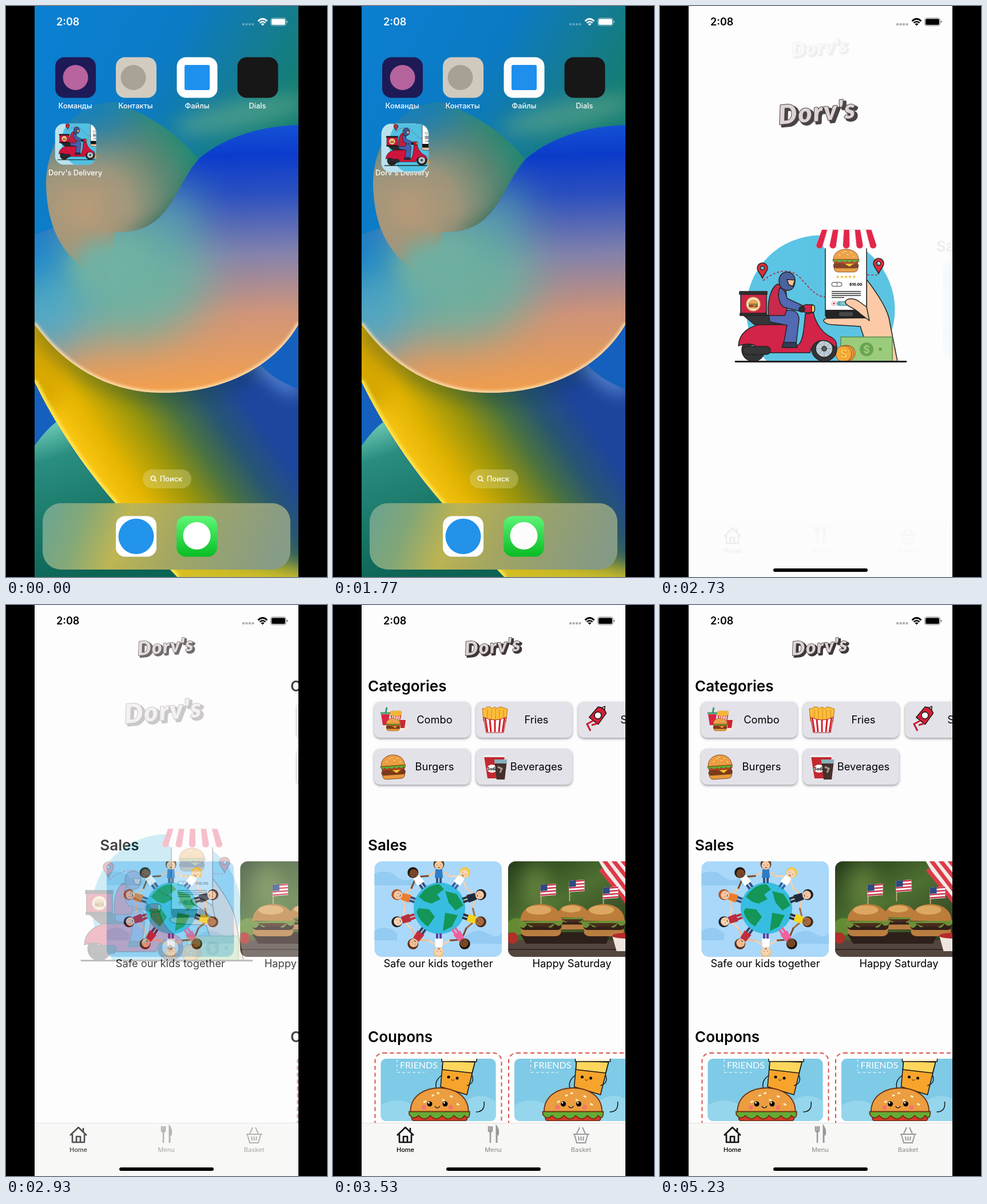
Write an HTML page that moves like this. It is 561 px wide and 998 px high and loops after 5.63 s.

```html
<!DOCTYPE html>
<html lang="ru">
<head>
<meta charset="utf-8">
<title>Delivery app launch</title>
<style>
  html, body { margin: 0; width: 100%; height: 100%; overflow: hidden; background: #000; }
  svg { display: block; width: 100%; height: 100%; font-family: Inter, "Open Sans", sans-serif; }
  .mid { text-anchor: middle; }
  .card { fill: #e3e2e8; filter: drop-shadow(0 2px 2px #4458); }
  .h { font-size: 26px; font-weight: 600; }
  .t { font-size: 18.3px; text-anchor: middle; }
  .lab { font-size: 12.8px; font-weight: 500; fill: #fff; text-anchor: middle; }
  .tab { font-size: 11px; font-weight: 500; text-anchor: middle; }
  .ink { stroke: #161616; stroke-width: 1.5; stroke-linejoin: round; }
  .soft { filter: blur(16px); }
  .haze { filter: blur(38px); }
  .rim { fill: none; filter: blur(2.5px); }
</style>
</head>
<body>
<svg viewBox="0 0 561 998">
<defs>
  <clipPath id="screen"><path d="M50 0H511V998H50Z"/></clipPath>
  <clipPath id="winClip"><rect id="winRect"/></clipPath>
  <clipPath id="tileClip"><rect width="72" height="72" rx="16"/></clipPath>
  <clipPath id="saleClip"><rect x="72.5" y="448" width="222.5" height="167" rx="13"/></clipPath>
  <clipPath id="coupClip"><rect x="83.5" y="793" width="201" height="109" rx="9"/></clipPath>
  <clipPath id="bodyClip"><path d="M512 208C430 210 370 238 336 268C308 300 296 345 265 372C243 392 215 396 190 395C160 394 135 388 110 378L49 400V555C110 640 190 676 275 676C380 676 470 630 512 555Z"/></clipPath>
  <clipPath id="curlClip"><path d="M336 268C300 222 250 190 190 168C115 168 70 240 70 312C72 390 100 450 180 482L190 395C215 396 243 392 265 372C296 345 308 300 336 268Z"/></clipPath>
  <clipPath id="bandClip"><path d="M49 655C90 740 140 810 190 868C230 915 265 963 300 999H512V670Q460 650 440 620L275 640L49 540Z"/></clipPath>
  <linearGradient id="sky" gradientUnits="userSpaceOnUse" x1="120" y1="0" x2="470" y2="200">
    <stop stop-color="#0b7fd0"/><stop offset=".45" stop-color="#0b7bc6"/><stop offset=".75" stop-color="#147c98"/><stop offset="1" stop-color="#147e74"/></linearGradient>
  <radialGradient id="curl" gradientUnits="userSpaceOnUse" cx="135" cy="355" r="235">
    <stop stop-color="#b89b78"/><stop offset=".35" stop-color="#a0977c"/><stop offset=".65" stop-color="#5d8873"/><stop offset="1" stop-color="#128b74"/></radialGradient>
  <linearGradient id="orb" gradientUnits="userSpaceOnUse" x1="390" y1="215" x2="405" y2="676">
    <stop stop-color="#1450d6"/><stop offset=".1" stop-color="#0b3ccc"/><stop offset=".25" stop-color="#2c50c0"/><stop offset=".48" stop-color="#8583ac"/><stop offset=".7" stop-color="#d0957a"/><stop offset="1" stop-color="#f5a14c"/></linearGradient>
  <linearGradient id="band" gradientUnits="userSpaceOnUse" x1="150" y1="830" x2="400" y2="660">
    <stop stop-color="#ffc917"/><stop offset=".2" stop-color="#e2b400"/><stop offset=".42" stop-color="#99960c"/><stop offset=".62" stop-color="#4b7340"/><stop offset=".8" stop-color="#285672"/><stop offset="1" stop-color="#1d469e"/></linearGradient>
  <linearGradient id="leaf" x2=".3" y2="1"><stop stop-color="#7ad4c0"/><stop offset=".25" stop-color="#298e80"/><stop offset="1" stop-color="#0c6455"/></linearGradient>
  <linearGradient id="dock" x2="1" y2=".1"><stop stop-color="#69a594"/><stop offset=".18" stop-color="#84a878"/><stop offset=".36" stop-color="#beb553"/><stop offset=".6" stop-color="#a2a664"/><stop offset="1" stop-color="#879c86"/></linearGradient>
  <linearGradient id="green" x2="0" y2="1"><stop stop-color="#5df777"/><stop offset="1" stop-color="#08bd24"/></linearGradient>
  <linearGradient id="photo" x2=".8" y2="1"><stop stop-color="#233a1a"/><stop offset=".45" stop-color="#4d7031"/><stop offset="1" stop-color="#2c331f"/></linearGradient>

  <g id="status">
    <text x="88" y="34" font-size="18" font-weight="600" fill="currentColor">2:08</text>
    <g fill="currentColor" opacity=".3"><rect x="413" y="30" width="4" height="4" rx="1"/><rect x="418.5" y="30" width="4" height="4" rx="1"/><rect x="424" y="30" width="4" height="4" rx="1"/><rect x="429.5" y="30" width="4" height="4" rx="1"/></g>
    <path d="M440.500 26.500Q448.500 18.500 456.500 26.500M443.500 29.500Q448.500 25 453.500 29.500" fill="none" stroke="currentColor" stroke-width="2.600"/>
    <path d="M445.500 31.500Q448.500 29 451.500 31.500L448.500 34.500Z" fill="currentColor"/>
    <rect x="462.500" y="21" width="27" height="13.500" rx="4" fill="none" stroke="currentColor" opacity=".5"/>
    <rect x="464" y="22.500" width="24" height="10.500" rx="2.500" fill="currentColor"/>
    <path d="M491 25.500q2 2 0 4.500z" fill="currentColor"/>
  </g>

  <g id="word" font-family="Lato, sans-serif" font-weight="900" font-style="italic" font-size="46" letter-spacing="2" text-anchor="middle" stroke-linejoin="round" transform="rotate(-5)">
    <text x="4" y="4" fill="#3f3739" stroke="#3f3739" stroke-width="4">Dorv's</text>
    <text fill="#dad3d1" stroke="#3f3739" stroke-width="2" paint-order="stroke">Dorv's</text>
  </g>

  <!-- 46 wide, centred on the origin -->
  <g id="burger" stroke="#6b3212" stroke-width=".8">
    <path d="M-21 12H21Q21 20 13 20H-13Q-21 20 -21 12Z" fill="#e79a3d"/>
    <rect x="-22" y="5" width="44" height="8" rx="4" fill="#7c3a1d"/>
    <path d="M-21 4H21L12 7L6 11L-2 6Z" fill="#ffc52e"/>
    <rect x="-21" y="1" width="42" height="4" rx="2" fill="#d93a2b"/>
    <path d="M-23 0Q-20 5 -16 1Q-11 6 -7 1Q-2 6 2 1Q7 6 11 1Q16 6 19 1Q23 5 23 -2H-23Z" fill="#64ac35"/>
    <path d="M-22 -2C-22 -26 22 -26 22 -2Z" fill="#ec9d40"/>
    <path d="M-12 -9l2 -1M-6 -14l2 -.5M2 -11l2 .5M8 -14l2 1M13 -8l2 1M-2 -16h2" stroke="#fff0c0" stroke-width="1.300"/>
  </g>
  <path id="pin" class="ink" d="M0 13C-3 5 -9 1 -9 -5A9 9 0 0 1 9 -5C9 1 3 5 0 13ZM-3.500 -5a3.500 3.500 0 0 0 7 0a3.500 3.500 0 0 0 -7 0Z" fill="#dc1f2c" fill-rule="evenodd"/>

  <g id="scene">
    <path d="M187 621A130 130 0 1 1 374 621Z" fill="#51c0e2"/>
    <path d="M180 480C205 460 228 458 245 475C262 493 270 507 290 509M362 470h20" fill="none" stroke="#a3233b" stroke-width="1.700" stroke-dasharray="4 3"/>
    <use href="#pin" x="179" y="463"/><use href="#pin" x="382" y="455"/>
    <path class="ink" d="M361 478C378 500 395 525 400 545L415 621H370L350 560L300 557C288 556 280 548 292 546L361 545Z" fill="#fcc7a0"/>
    <rect class="ink" x="289" y="397" width="72" height="148" rx="5" fill="#fff" stroke-width="2.500"/>
    <path d="M289 531H361V541Q361 546 356 546H294Q289 546 289 541Z" fill="#151515"/>
    <rect x="313" y="535" width="24" height="7" rx="2" fill="#3b3b3b"/>
    <use href="#burger" x="325" y="445"/>
    <text class="mid" x="325" y="476" font-size="8" fill="#f5b31a" font-family="DejaVu Sans, sans-serif">★★★★★</text>
    <rect x="300" y="483" width="18" height="7" rx="3.500" fill="#fff" stroke="#222"/>
    <text class="mid" x="309" y="489" font-size="6">1</text>
    <text x="331" y="489" font-size="6.500" font-weight="800">$10.00</text>
    <path d="M300 499H351M300 502.500H351M300 506H351M300 509.500H322" stroke="#222" stroke-width="1.600"/>
    <circle cx="304" cy="520" r="4" fill="#fff" stroke="#d89a9a"/><circle cx="304" cy="520" r="1.800" fill="#d32039"/>
    <rect x="309" y="516" width="25" height="8" rx="4" fill="#4ba8b4"/>
    <text x="315" y="522" font-size="5" fill="#fff">ORDER</text>
    <path class="ink" d="M324 516C328 509 342 511 350 518L361 526L366 550L350 538C338 526 322 524 324 516Z" fill="#fcc7a0"/>
    <g id="awning"/>
    <rect x="316" y="578.500" width="90" height="43" fill="#93c972" stroke="#4d8440" stroke-width="1.500"/>
    <g fill="#5f9d48"><circle cx="361" cy="600" r="12"/><circle cx="385" cy="600" r="3"/><circle cx="337" cy="600" r="3"/></g>
    <text class="mid" x="361" y="607" font-size="19" font-weight="700" fill="#93c972">$</text>
    <g fill="#f6a52c" stroke="#8a3d17"><circle cx="327" cy="607" r="14"/><circle cx="324" cy="607" r="14"/><circle cx="321" cy="608" r="14"/></g>
    <text class="mid" x="321" y="615" font-size="20" font-weight="700" fill="#ffdc50" stroke="#d66f17" stroke-width=".6">$</text>
    <g class="ink">
      <circle cx="163" cy="601" r="20" fill="#252628"/><circle cx="163" cy="601" r="9" fill="#8f9ba2"/>
      <circle cx="287" cy="599" r="22" fill="#252628"/><circle cx="287" cy="599" r="15" fill="#b9cad3"/>
      <path d="M287 585V613M273 599H301M277 589L297 609M297 589L277 609" stroke="#788891" stroke-width=".8"/>
      <circle cx="287" cy="599" r="4" fill="#555"/>
      <path d="M137 594C138 572 155 559 180 556H222C226 575 222 586 216 592L240 593C250 590 252 560 254 538L268 536C272 555 285 573 300 579C309 585 310 592 306 597C290 577 268 582 262 606H172C172 592 160 587 137 594Z" fill="#cf143c"/>
      <rect x="145" y="595" width="48" height="14" rx="7" fill="#2a2a2d"/>
      <path d="M145 540H190L226 549L222 557H165Z" fill="#28282b"/>
      <rect x="141" y="502" width="45" height="37" fill="#c9193b"/>
      <path d="M139 499H187V504H139ZM140 537H186V541H140Z" fill="#222"/>
      <circle cx="163" cy="521" r="12" fill="#f8e6bd" stroke="#d9a05b"/>
      <path d="M190 540L222 532Q242 530 243 547L238 590H216L222 558L192 552Z" fill="#465fae"/>
      <path d="M216 588H238L240 597H213Z" fill="#24304a"/>
      <path d="M205 486L220 491L222 530L218 541H190C187 520 192 494 205 486Z" fill="#c41d40"/>
      <path d="M209 493Q218 493 222 511L250 524L246 534L215 526Q203 512 209 493Z" fill="#465fae"/>
      <rect x="250" y="522" width="20" height="14" rx="5" fill="#cf143c"/><path d="M265 523h4q3 6 0 12h-4z" fill="#ffd55a"/>
      <circle cx="248" cy="530" r="5" fill="#222"/>
      <path d="M208 480C208 460 236 460 236 480Q235 497 223 497Q208 496 208 480Z" fill="#3e5796"/>
      <path d="M222 478L236 479L232 490L225 487Z" fill="#f3bc95"/>
    </g>
    <use href="#burger" transform="translate(163 521) scale(.36)"/>
    <path d="M132 621.500H430" stroke="#111" stroke-width="2.800" stroke-linecap="round"/>
  </g>

  <g id="appIcon" clip-path="url(#tileClip)">
    <rect width="72" height="72" fill="#b9e2ee"/>
    <circle cx="58" cy="33" r="46" fill="#51c0e2"/>
    <use href="#scene" transform="translate(6.500 63) scale(.365) translate(-136 -621)"/>
  </g>
  <rect id="tile" width="71" height="71" rx="16"/>
  <g id="flag">
    <path d="M1 0V36" stroke="#d8b98a" stroke-width="1.500"/>
    <path d="M0 0L27 -2V18L0 20Z" fill="#fff"/>
    <path d="M0 1.500L27 -.5M0 7L27 5M0 12.500L27 10.500M0 18L27 16" stroke="#c9344b" stroke-width="2.600"/>
    <path d="M0 0L12 -1V10L0 11Z" fill="#2e4a80"/>
  </g>
  <g id="meal">
    <path d="M-34 22Q-38 34 -26 36H26Q38 34 34 22Z" fill="#b97d40"/>
    <rect x="-36" y="9" width="72" height="16" rx="7" fill="#33201a"/>
    <path d="M-40 10Q-34 30 -24 15Q-16 26 -8 14Q0 24 8 14Q16 28 24 14Q34 24 40 8Z" fill="#6b8f36"/>
    <path d="M-28 13H24L14 19H-14Z" fill="#4a2a1c"/>
    <path d="M-36 9C-36 -30 36 -30 36 9Z" fill="#bd7d3b"/><ellipse cx="-4" cy="-10" rx="22" ry="8" fill="#dca861"/>
  </g>
  <g id="fries">
    <path d="M-20 2L-22 -20H-16L-14 -23H-8L-5 -20L0 -23L5 -20L8 -23L14 -22L22 -19L19 4Z" fill="#fbbd3a" stroke="#b9741b"/>
    <path d="M-13 -18V0M-6 -18V0M1 -20V0M8 -18V0M15 -18V0" stroke="#cf8a1e"/>
    <path d="M-20 -5Q0 5 20 -5L15 22H-15Z" fill="#fff" stroke="#a32020"/>
    <path d="M-17 -4L-13 21M-9 -1L-7 21M0 0V21M9 -1L7 21M17 -4L13 21" stroke="#d4202c" stroke-width="3"/>
  </g>
  <g id="coupon">
    <rect x="73.500" y="783" width="221" height="200" rx="14" fill="none" stroke="#d9534b" stroke-width="2" stroke-dasharray="7 5"/>
    <g clip-path="url(#coupClip)">
      <path d="M83 793H285V902H83Z" fill="#7fcae6"/>
      <path d="M83 875Q115 855 150 880T220 875T285 868V902H83Z" fill="#95d6ec"/>
      <text x="117" y="810" font-family="Lato, sans-serif" font-size="16" fill="#fff">FRIENDS</text>
      <path d="M112 794V814M112 817H160" stroke="#fff" stroke-dasharray="5 4"/>
      <g class="ink">
        <path d="M192 797L248 799L234 856L188 842Z" fill="#f6a42c"/><path d="M192 797L248 799L243 818L191 812Z" fill="#ffd65c"/>
        <path d="M190 790H251V798H190Z" fill="#fff5dd"/>
        <path d="M190 822Q176 832 181 846M234 840Q248 836 243 822M250 886Q266 886 264 868" fill="none"/>
      </g>
      <circle cx="202" cy="825" r="2.500"/><circle cx="217" cy="827" r="2.500"/><path d="M207 829q2 4 5 0" fill="none" stroke="#222"/>
      <use href="#burger" transform="translate(186 890) scale(2.300)"/>
      <circle cx="169" cy="872" r="4.500"/><circle cx="196" cy="872" r="4.500"/><path d="M178 876q4 6 9 0" fill="none" stroke="#222" stroke-width="1.500"/>
      <g fill="#fff"><circle cx="167.500" cy="870" r="1.500"/><circle cx="194.500" cy="870" r="1.500"/></g>
      <g fill="#f2766b"><circle cx="159" cy="878" r="4"/><circle cx="206" cy="878" r="4"/></g>
    </g>
  </g>
</defs>

<rect width="561" height="998"/>
<g clip-path="url(#screen)">
  <g id="home">
    <rect x="50" width="461" height="998" fill="url(#sky)"/>
    <path d="M50 400H511V998H50Z" fill="#1560bf"/>
    <ellipse cx="50" cy="400" rx="90" ry="80" fill="#0c7dc8" class="soft"/>
    <ellipse cx="410" cy="190" rx="120" ry="24" fill="#5aa48c" class="soft" transform="rotate(-12 410 190)" opacity=".7"/>
    <g clip-path="url(#bandClip)">
      <rect x="49" y="530" width="463" height="470" fill="url(#band)"/>
      <ellipse cx="60" cy="640" rx="50" ry="70" fill="#d9a900" class="soft"/>
      <ellipse cx="400" cy="1010" rx="170" ry="36" fill="#d0c02c" class="soft"/>
      <path class="soft" d="M49 555C110 640 190 676 275 676C380 676 470 630 512 555" fill="none" stroke="#123c3a" stroke-width="24" opacity=".45"/>
      <path class="soft" d="M440 615Q468 650 514 670" fill="none" stroke="#6f9fe8" stroke-width="22"/>
      <path class="rim" d="M49 655C90 740 140 810 190 868C230 915 265 963 300 999" stroke="#ffe650" stroke-width="10"/>
    </g>
    <path d="M49 770Q70 740 88 727C124 791 157 830 190 868C230 915 265 963 300 999H49Z" fill="url(#leaf)"/>
    <g clip-path="url(#bodyClip)">
      <rect x="49" y="200" width="463" height="480" fill="url(#orb)"/>
      <g class="haze">
        <ellipse cx="205" cy="470" rx="150" ry="115" fill="#70b1a0"/>
        <ellipse cx="290" cy="370" rx="45" ry="60" fill="#559fae"/>
        <ellipse cx="60" cy="535" rx="75" ry="85" fill="#4fa9c6"/>
        <ellipse cx="30" cy="420" rx="85" ry="60" fill="#1280cc"/>
      </g>
      <path class="rim" d="M49 555C110 640 190 676 275 676C380 676 470 630 512 555" stroke="#ffdfae" stroke-width="7"/>
    </g>
    <g clip-path="url(#curlClip)">
      <rect x="60" y="150" width="290" height="340" fill="url(#curl)"/>
      <ellipse cx="125" cy="175" rx="105" ry="62" fill="#147fc0" class="haze"/>
      <path d="M345 262C318 340 280 385 190 402H320Z" fill="#0c5547" class="soft" opacity=".75"/>
    </g>
    <g clip-path="url(#bodyClip)"><ellipse cx="180" cy="455" rx="62" ry="46" fill="#70b1a4" class="soft"/></g>
    <use href="#status" color="#fff"/>
    <use href="#tile" x="86" y="89.500" fill="#1d1a57"/><circle cx="121.500" cy="125" r="22" fill="#b7649f"/>
    <use href="#tile" x="192" y="89.500" fill="#d2ccc0"/><circle cx="222.500" cy="125" r="22" fill="#a9a296"/>
    <use href="#tile" x="298.500" y="89.500" fill="#fff"/><rect x="312" y="103" width="44" height="44" rx="3" fill="#1e91ef"/>
    <use href="#tile" x="404.500" y="89.500" fill="#171717"/>
    <use href="#appIcon" x="85.500" y="205.500"/>
    <g class="lab"><text x="121" y="179">Команды</text><text x="226.500" y="179">Контакты</text><text x="334" y="179">Файлы</text><text x="439.500" y="179">Dials</text><text x="121" y="296">Dorv's Delivery</text></g>
    <rect x="239" y="810" width="85" height="33" rx="16.500" fill="#e8e29a" opacity=".34"/>
    <g fill="none" stroke="#fff" stroke-width="1.700"><circle cx="257" cy="825.500" r="3.800"/><path d="M260 828.500l3 3"/></g>
    <text class="lab" x="288.500" y="831">Поиск</text>
    <rect x="64" y="869" width="433" height="116" rx="32" fill="url(#dock)"/>
    <use href="#tile" x="192" y="891.500" fill="#fff"/><circle cx="227.500" cy="927" r="31" fill="#2394ec"/>
    <use href="#tile" x="298" y="891.500" fill="url(#green)"/><circle cx="333.500" cy="926" r="24" fill="#fff"/>
    <rect id="dim" x="50" width="461" height="998"/>
  </g>

  <g id="win" clip-path="url(#winClip)">
    <rect x="50" width="461" height="998" fill="#b9e2ee"/>
    <use id="grow" href="#appIcon"/>
    <g id="splash">
      <rect x="40" y="-10" width="481" height="1018" fill="#fdfdfd"/>
      <use href="#status"/>
      <use href="#word" transform="translate(276 201)"/>
      <use href="#scene"/>
      <rect id="bar" x="198" y="983" width="165" height="6" rx="3"/>
    </g>
  </g>

  <g id="page">
    <rect x="50" width="461" height="998" fill="#fdfdfd"/>
    <use href="#status"/>
    <use href="#word" transform="translate(280 84) scale(.725)"/>
    <g id="cats">
      <text class="h" x="61" y="151">Categories</text>
      <g id="cards"/>
      <g transform="translate(106 201)">
        <ellipse cx="3" cy="14" rx="20" ry="6" fill="#f4ead7"/>
        <path d="M-22 -10H-7L-10 9H-19Z" fill="#d92643"/><path d="M-23 -12H-6M-14 -12L-12 -22" stroke="#3a9a68" stroke-width="3"/>
        <use href="#fries" transform="translate(4 -6) scale(.45)"/><path d="M11 0H21L19 14H12Z" fill="#c9272d"/>
        <use href="#burger" transform="translate(-1 8) scale(.55)"/>
      </g>
      <use href="#fries" x="283" y="201"/>
      <g class="ink" transform="translate(463 193) rotate(38)"><path d="M-9 -12Q0 -18 9 -12L10 12H-10Z" fill="#d51f36"/><path d="M-3 -15L0 -20L3 -15Z" fill="#fff"/><circle r="6" fill="#fff"/></g>
      <path d="M455 202L444 208L450 220M462 207L452 210" fill="none" stroke="#c41c31" stroke-width="3"/>
      <use href="#burger" transform="translate(105 283) rotate(-4) scale(.94 1.050)"/>
      <path d="M264 264H300L295 303H270Z" fill="#c32830"/><path d="M263 262H301V266H263Z" fill="#eee"/><ellipse cx="278" cy="286" rx="9" ry="7" fill="#fff"/>
      <text class="mid" x="278" y="289" font-size="7" font-weight="700">Soda</text>
      <path d="M282 272H304L300 305H286Z" fill="#46302c"/><path d="M282 270H304V277H282Z" fill="#89b0bb"/><path d="M288 283l7 3l-3 7" stroke="#a89a96" stroke-width="3" fill="none"/>
    </g>
    <g id="sales">
      <text class="h" x="61" y="429">Sales</text>
      <g clip-path="url(#saleClip)">
        <path d="M72 448H296V616H72Z" fill="#a9d8fa"/>
        <path d="M72 470Q95 460 110 474T150 474V490H72ZM230 580Q250 562 270 574T296 570V592H230ZM72 570Q92 556 112 574V586H72Z" fill="#94cbf2"/>
        <circle cx="186" cy="530" r="45" fill="#37bde0"/>
        <path d="M150 510Q165 488 186 488L194 497L182 506L188 514L172 522L160 518ZM196 500L216 505L228 525L214 534L202 520ZM150 530L168 532L178 545L166 562Q150 552 146 536ZM196 538L218 542L208 562L192 570Z" fill="#139657"/>
        <g id="kids"/>
      </g>
      <g transform="translate(233.500)" clip-path="url(#saleClip)">
        <path d="M72 448H296V616H72Z" fill="url(#photo)"/>
        <ellipse cx="120" cy="490" rx="26" ry="40" fill="#88a552" class="soft" opacity=".5"/>
        <path d="M72 586H296V616H72Z" fill="#54463f"/><path d="M92 572H252L244 592H104Z" fill="#2d1f19"/><path d="M72 602H296" stroke="#312925" stroke-width="2"/>
        <path d="M231 448H296V528L262 500Z" fill="#f4e9e7"/><path d="M240 446L296 520M256 446L296 496M272 446L296 475M234 462L284 524" stroke="#db3b48" stroke-width="7"/>
        <use href="#flag" x="129" y="489"/><use href="#flag" x="179" y="482"/><use href="#flag" x="238" y="494"/>
        <ellipse cx="88" cy="562" rx="18" ry="15" fill="#648b34"/><circle cx="80" cy="582" r="10" fill="#af3029"/>
        <use href="#meal" transform="translate(186 539) scale(.78)"/>
        <use href="#meal" x="130" y="543"/><use href="#meal" x="240" y="543"/>
        <path d="M254 576H296V605H262Z" fill="#eee5df"/><ellipse cx="278" cy="578" rx="24" ry="5" fill="#b6292a"/>
      </g>
      <text class="t" x="184" y="633">Safe our kids together</text><text class="t" x="417.500" y="633">Happy Saturday</text>
    </g>
    <g id="coups"><text class="h" x="61" y="764">Coupons</text><use href="#coupon"/><use href="#coupon" x="233.500"/></g>
    <path d="M50 905H511V998H50Z" fill="#f7f7f6"/><path d="M50 905.500H511" stroke="#dedede"/>
    <path d="M112 927L126.500 913L141 927M116 925V939H137V925M123 939V929H130V939M135 920V914" fill="none" stroke="#111" stroke-width="2.600" stroke-linejoin="round"/>
    <g fill="none" stroke="#999" stroke-width="2"><path d="M420 925H448M422 926L426 940H441L445 926M426 924L431 913M441 924L436 913M429 929L430 936M433.500 929V936M438 929L437 936"/>
      <path d="M272 911V919Q275 923 278 919V911M275 911V940" stroke-width="2.500"/><path d="M286 940V912Q290 918 288 927" stroke-width="3"/></g>
    <g class="tab"><text x="126.500" y="956">Home</text><text x="280" y="956" fill="#999">Menu</text><text x="433.500" y="956" fill="#999">Basket</text></g>
    <rect x="198" y="983" width="165" height="6" rx="3"/>
  </g>
</g>
</svg>
<script>
const $ = id => document.getElementById(id);
const set = (id, attrs) => { for (const k in attrs) $(id).setAttribute(k, attrs[k]); };
const lerp = (a, b, k) => a + (b - a) * k;
const ramp = (t, from, to) => Math.min(1, Math.max(0, (t - from) / (to - from)));

$('awning').innerHTML = Array.from({ length: 9 }, (_, i) => {
  const top = 283 + i * 9.6, low = 273 + i * 11.7;
  return `<path d="M${top} 391h9.6L${low + 11.7} 418a5.85 5.85 0 0 1 -11.7 0Z" fill="${i % 2 ? '#fff' : '#e3173f'}" stroke="#d8b9be" stroke-width=".4"/>`;
}).join('');

$('cards').innerHTML = [
  [72, 169, 'Combo'], [250, 169, 'Fries'], [428.5, 169, 'Sauces'],
  [72, 251, 'Burgers'], [250, 251, 'Beverages']
].map(([x, y, name]) => `<rect class="card" x="${x}" y="${y}" width="168" height="63" rx="10"/>
  <text class="t" x="${x + 105.5}" y="${y + 38}">${name}</text>`).join('');

// skin, hair, shirt, trousers; clockwise from the top
$('kids').innerHTML = [
  '#f6c7a0 #5b3a24 #2d7cc9 #38527a', '#f9d2ae #f3c837 #fff #3563a8',
  '#f6c7a0 #1e1e24 #222b3c #333', '#a66a3f #4b2a1b #f5d51f #2a2f3c',
  '#7b4728 #20150f #f0609a #f0609a', '#f9d2ae #e5c48c #fff #5d40a0',
  '#f3bd93 #5a2e1a #c22d3c #35405f', '#f9d2ae #22202a #b92e3d #b92e3d',
  '#f6c7a0 #b5552a #ee7b2e #36507c', '#7b4728 #20150f #fff #36507c'
].map((row, i) => {
  const [skin, hair, shirt, legs] = row.split(' ');
  return `<g transform="translate(185 530) rotate(${i * 36})">
    <path d="M-3 -44V-54M3 -44V-54" stroke="${legs}" stroke-width="4"/>
    <path d="M-6 -64L-19 -56M6 -64L19 -56" stroke="${skin}" stroke-width="3"/>
    <path d="M-6 -68H6L7 -53H-7Z" fill="${shirt}"/>
    <circle cy="-77" r="9.500" fill="${hair}"/><circle cy="-75" r="7.500" fill="${skin}"/>
    <path d="M-3 -76v1M3 -76v1M-2 -71h4" stroke="#333"/></g>`;
}).join('');

const LOOP = 5630, OPEN = 1760, start = performance.now();
const slide = (id, t, from, to) =>
  set(id, { transform: `translate(${461 * (1 - ramp(t, from, to)) ** 2})` });

function draw() {
  const t = (performance.now() - start) % LOOP;

  // the app window springs open from its icon
  const s = Math.max(0, t - OPEN) * .023;
  const p = t < 2290 ? 1 - (1 + s) * Math.exp(-s) : 1;
  const w = lerp(72, 461, p), h = lerp(72, 998, p ** 1.2);
  const cx = lerp(121.5, 280.5, p), cy = lerp(241.5, 499, p);
  const x = cx - w / 2, y = cy - h / 2;
  set('win', { visibility: t < OPEN ? 'hidden' : 'visible' });
  set('winRect', { x, y, width: w, height: h, rx: p < 1 ? lerp(16, 48, p) : 0 });
  set('grow', { transform: `translate(${x} ${y}) scale(${w / 72})` });
  set('splash', {
    transform: `translate(${cx} ${cy}) scale(${w / 461}) translate(-280.5 -499)`,
    opacity: ramp(p, .1, .55)
  });
  set('bar', { opacity: lerp(.55, 1, ramp(t, 2070, 2290)) });
  set('dim', { opacity: .45 * p });

  set('page', { opacity: ramp(t, 2712, 3010) });
  slide('sales', t, 2713, 3127);
  slide('cats', t, 2921, 3286);
  slide('coups', t, 2921, 3286);
  requestAnimationFrame(draw);
}
draw();
</script>
</body>
</html>
```
